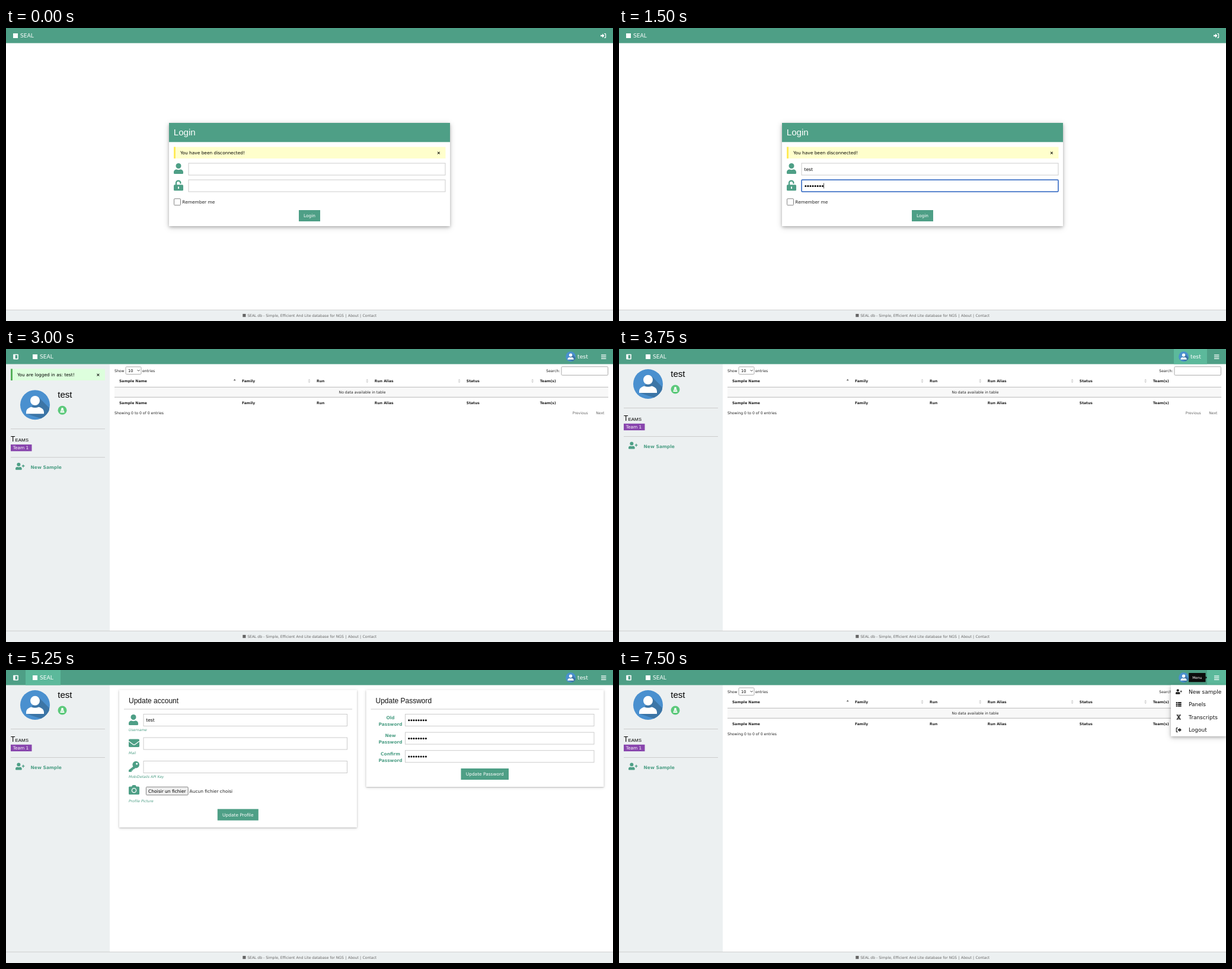
Animation, 1024 px wide and 494 px high, one loop 8 s. Source, as an HTML page:

```html
<!DOCTYPE html>
<html lang="en">
<head>
<meta charset="utf-8">
<title>SEAL db</title>
<style>
html, body { margin: 0; width: 100%; height: 100%; overflow: hidden; background: #fff; }
svg { display: block; width: 1024px; height: 494px; }
text { font-family: "DejaVu Sans", Verdana, sans-serif; white-space: pre; }
.head { font-family: "Liberation Sans", Arial, sans-serif; }
.bold { font-weight: bold; }
.mid { text-anchor: middle; }
.caps { font-variant: small-caps; }
.it { font-style: italic; }
.big { filter: drop-shadow(0 2px 2.5px rgba(0,0,0,.2)) drop-shadow(0 2px 5px rgba(0,0,0,.19)); }
.card { filter: drop-shadow(0 1px 1.3px rgba(0,0,0,.2)) drop-shadow(0 1px 2.5px rgba(0,0,0,.14)); }
[data-part] { display: none; }
</style>
</head>
<body>
<svg id="stage" viewBox="0 0 1024 494" xmlns="http://www.w3.org/2000/svg"></svg>
<script>
const GREEN = '#4e9f86', LIGHT = '#5cb99b', PALE = '#ecf0f1', INK = '#222', BLUE = '#2f68c8';
const LOGIN_NAME = 'test';
const STEP = 750, LOOP = 8000;

// Parts visible during each step
const steps = [
  'login',
  'login name focusName',
  'login name secret focusSecret',
  'login name secret press',
  'app flash table',
  'app table overAccount',
  'app account',
  'app account overHome',
  'app table',
  'app table overMenu',
  'app table overMenu drop'
].map(s => s.split(' '));

// Drawing helpers
const text = (x, y, str, size, fill = INK, cls = '') =>
  `<text x="${x}" y="${y}" font-size="${size}" fill="${fill}" class="${cls}">${str}</text>`;
const box = (x, y, w, h, fill, more = '') =>
  `<rect x="${x}" y="${y}" width="${w}" height="${h}" fill="${fill}" ${more}/>`;
const disc = (x, y, r, fill) => `<circle cx="${x}" cy="${y}" r="${r}" fill="${fill}"/>`;
const shape = (d, fill, more = '') => `<path d="${d}" fill="${fill}" ${more}/>`;
const line = (d, color, w = 1) => `<path d="${d}" fill="none" stroke="${color}" stroke-width="${w}"/>`;
const part = (name, ...items) => `<g data-part="${name}">${items.join('')}</g>`;
const at = (x, y, inner, scale = 1) => `<g transform="translate(${x} ${y}) scale(${scale})">${inner}</g>`;
const rule = (x1, x2, y, color = '#ccc', w = 1) => line(`M${x1} ${y}H${x2}`, color, w);
const field = (x, y, w, h = 20, color = '#ccc') => box(x + .5, y + .5, w - 1, h - 1, '#fff', `stroke="${color}"`);
const ring = (x, y, w, h) => box(x, y, w, h, 'none', `stroke="${BLUE}" stroke-width="1.5" rx="1.5"`);
const button = (x, y, w, h, label, fill = GREEN) =>
  box(x, y, w, h, fill) + text(x + w / 2, y + h / 2 + 2.8, label, 7.45, '#fff', 'mid');
const dots = (x, y) => Array.from({ length: 8 }, (_, i) => disc(x + i * 4.08, y, 1.5, '#000')).join('');
const notice = (x, y, w, msg, fill, edge) =>
  box(x, y, w, 19.5, fill) + box(x, y, 3, 19.5, edge) +
  text(x + 11, y + 12.6, msg, 7.42, '#000') + text(x + w - 11.5, y + 12.6, '×', 7.5, '#000', 'mid bold');

// Icons, placed by their top left corner
const person = (x, y, fill = GREEN, s = 1) => at(x, y,
  disc(8, 4.5, 4.5, fill) + shape('M0 18V15.5C0 12 2 10.5 5 10.5Q8 12 11 10.5C14 10.5 16 12 16 15.5V16.5Q16 18 14.5 18H1.5Q0 18 0 16.5Z', fill), s);
const addPerson = (x, y, fill, s = 1) =>
  at(x, y, person(0, 0, fill, .67) + line('M10.8 5.6H15.4M13.1 3.3V7.9', fill, 1.4), s);
const lock = (x, y) => at(x, y,
  box(0, 8, 16, 10, GREEN, 'rx="1.6"') + line('M4 9V5A3.6 3.6 0 0 1 11.4 5V6.2', GREEN, 2.3) +
  box(7, 11, 2, 4, '#fff', 'rx="1"'));
const envelope = (x, y) => at(x, y,
  box(0, 0, 18, 13.5, GREEN, 'rx="1.7"') + line('M0 3.6L7 8.7Q9 10.2 11 8.7L18 3.6', '#fff', 1.2));
const key = (x, y) => at(x, y,
  shape('M8.5 8.2L0 15V18H5V15.8H7V13.6H9L11 11.5Z', GREEN) + disc(12.2, 5.8, 5.8, GREEN) + disc(13.7, 4.3, 1.6, '#fff'));
const camera = (x, y) => at(x, y,
  shape('M5 2.5L6 .8Q6.4 0 7.3 0H10.7Q11.6 0 12 .8L13 2.5H16.4Q18 2.5 18 4V14.4Q18 16 16.4 16H1.6Q0 16 0 14.4V4Q0 2.5 1.6 2.5Z', GREEN) +
  `<circle cx="9" cy="9" r="3.6" fill="none" stroke="#fff" stroke-width="1.3"/>`);
const doorArrow = (x, y, fill) => at(x, y,
  shape('M0 2.8H3V.6L6.6 4L3 7.4V5.2H0Z', fill) + line('M6.2 .6H8Q8.6 .6 8.6 1.2V6.8Q8.6 7.4 8 7.4H6.2', fill, 1.2));
const exitArrow = (x, y, fill) => at(x, y,
  shape('M3 2.8H5.6V.6L9.2 4L5.6 7.4V5.2H3Z', fill) + line('M3 .6H1.2Q.6 .6 .6 1.2V6.8Q.6 7.4 1.2 7.4H3', fill, 1.2));
const list = (x, y, fill) => at(x, y,
  [0, 2.8, 5.6].map(r => box(0, r, 2.3, 2.1, fill) + box(3, r, 6, 2.1, fill)).join(''));
const helix = (x, y, fill) => at(x, y,
  line('M1 0C1 4 7 4.5 7 9M7 0C7 4 1 4.5 1 9', fill, 1.2) + line('M1 .9H7M2 2.4H6M2 6.6H6M1 8.1H7', fill, .8));

const avatar = (x, y, s = 1) => at(x, y,
  disc(0, 0, 25, '#4a90cf') +
  shape('M6 -13L24 5Q25 12 15.5 19.6L10 23L-14 15Z', '#3c75a6') +
  disc(0, -7.2, 8, '#fff') +
  shape('M-15 15V12.5C-15 7 -10 4.3 -6 3.6Q0 6 6 3.6C10 4.3 15 7 15 12.5V15Z', '#fff'), s);
const badge = (x, y) => at(x, y,
  disc(0, 0, 7.5, '#5cc97b') + disc(0, -2.5, 1.8, '#fff') +
  shape('M-1.8 -1.6H1.8L3.7 4H-3.7Z', '#fff') + rule(-2, 2, 1.4, '#5cc97b', .8));

const brand = x => box(x, 9, 8, 8, '#fff') + text(x + 12, 16.2, 'SEAL', 9.15, '#fff');

function loginPage() {
  return part('login',
    `<g class="big">${box(275, 160, 474, 174, '#fff')}</g>`,
    box(275, 160, 474, 32.3, GREEN),
    text(282.8, 181, 'Login', 15.1, '#fff', 'head'),
    notice(283, 200.5, 458.5, 'You have been disconnected!', '#ffffcc', '#ffeb5a'),
    person(283, 228), field(307.5, 227.5, 434, 21),
    lock(283, 256.3), field(307.5, 255.5, 434, 21),
    box(283.5, 287.8, 11, 11, '#fff', 'stroke="#777" stroke-width=".9" rx="1.3"'),
    text(297.3, 296.2, 'Remember me', 7.45),
    button(494, 307, 36, 19, 'Login'),
    brand(12), doorArrow(1003, 9, '#fff')) +
  part('name', text(312.5, 240.8, LOGIN_NAME, 7.5, '#000')) +
  part('secret', dots(314.8, 266.4)) +
  part('focusName', ring(308, 228, 433, 20), box(328.2, 233.5, .7, 9, '#000')) +
  part('focusSecret', ring(308, 256, 433, 20), box(345.3, 261.5, .7, 9, '#000')) +
  part('press', button(494, 307, 36, 19, 'Login', LIGHT), ring(494, 307, 36, 19));
}

function sidebar() {
  return part('app', box(0, 25.5, 175, 450, PALE),
    part('flash', notice(8, 33.5, 159, `You are logged in as: ${LOGIN_NAME}!`, '#ddffdd', '#55b15a')),
    `<g id="side">${[
      avatar(49, 59),
      text(87.2, 47, LOGIN_NAME, 15.1, '#000', 'head'),
      badge(95, 68),
      rule(8, 167, 99.5),
      text(8, 121.2, 'Teams', 12.1, '#000', 'head caps'),
      box(8, 125.8, 35.5, 11.3, '#8845ad'),
      text(11.7, 134.3, 'Team 1', 7.4, '#fff'),
      rule(8, 167, 147.5),
      addPerson(16, 156.5, GREEN),
      text(41.6, 166.7, 'New Sample', 7.5, GREEN, 'bold')
    ].join('')}</g>`);
}

function tablePage() {
  const columns = [[191, 'Sample Name'], [398, 'Family'], [524, 'Run'], [621.8, 'Run Alias'], [776.8, 'Status'], [900.8, 'Team(s)']];
  const names = y => columns.map(([x, s]) => text(x, y, s, 6.05, INK, 'bold')).join('');
  const arrows = [385.7, 511.5, 609.3, 764.6, 888.2].map((x, i) =>
    shape(`M${x - 2} 53.3L${x} 50.6L${x + 2} 53.3Z`, i ? '#d0d0d0' : '#666') +
    (i ? shape(`M${x - 2} 54.6L${x} 57.2L${x + 2} 54.6Z`, '#d0d0d0') : '')).join('');
  return part('table',
    text(183, 38.6, 'Show', 6.15),
    box(202, 30, 26, 12.6, '#fff', 'stroke="#aaa" rx="1.5"'),
    text(206, 38.9, '10', 6.6, '#000'), line('M221.6 35.2L223.6 37.2L225.6 35.2', '#222', .9),
    text(230, 38.6, 'entries', 6.15),
    text(911.3, 39.4, 'Search:', 6.15),
    box(937, 29.8, 78.5, 14.4, '#fff', 'stroke="#aaa" rx="1.5"'),
    names(56.3), arrows,
    box(183, 64, 833, 17.3, '#f8f8f8'),
    rule(183, 1016, 64.3, '#aaa', .8), rule(183, 1016, 81.3, '#aaa', .8),
    text(601, 74.8, 'No data available in table', 6.15, INK, 'mid'),
    names(93.2),
    text(183, 109.8, 'Showing 0 to 0 of 0 entries', 6.15),
    text(955.8, 110.3, 'Previous', 6.15, '#666'),
    text(995.2, 110.3, 'Next', 6.15, '#666'));
}

function accountPage() {
  const panel = (x, w, h, title) =>
    `<g class="card">${box(x, 33.5, w, h, '#fff')}</g>` +
    text(x + 16, 55.6, title, 12, '#111', 'head') + rule(x + 8, x + w - 8, 66);
  const caption = (y, s) => text(207, y, s, 6, GREEN, 'it');
  const secrets = ['Old', 'New', 'Confirm'].map((s, i) => {
    const y = i * 30.6;
    return text(648.5, 82.5 + y, s, 7.45, GREEN, 'mid bold') + text(648.5, 93.8 + y, 'Password', 7.45, GREEN, 'mid bold') +
      field(673, 74 + y, 319.5, 21) + dots(679.8, 84.8 + y);
  }).join('');
  return part('account',
    panel(191, 401, 232, 'Update account'),
    person(207, 75), field(231.5, 74, 344.5, 21), text(236.3, 87.3, LOGIN_NAME, 7.5, '#000'), caption(102.7, 'Username'),
    envelope(207, 116.5), field(231.5, 113.5, 344.5, 21), caption(142.2, 'Mail'),
    key(207, 153.8), field(231.5, 153, 344.5, 21), caption(181.8, 'MobiDetails API Key'),
    camera(207, 194), box(236.4, 197.2, 70.8, 13.6, '#efefef', 'stroke="#777" stroke-width=".9" rx="1.3"'),
    text(240, 206.8, 'Choisir un fichier', 7.5, '#000'), text(309.6, 206.8, 'Aucun fichier choisi', 7.45),
    caption(223.3, 'Profile Picture'),
    button(356.8, 234.4, 69, 19.2, 'Update Profile'),
    panel(607.5, 401, 163.5, 'Update Password'),
    secrets,
    button(767.5, 166, 80.5, 19, 'Update Password'));
}

function topBar() {
  return box(0, 0, 1024, 25.5, GREEN) +
    part('overHome', box(33, 0, 59, 25.5, LIGHT)) +
    part('overAccount', box(936, 0, 56, 25.5, LIGHT)) +
    part('overMenu', box(992, 0, 32, 25.5, LIGHT)) +
    part('app',
      box(12.2, 8.8, 8.6, 8.6, '#fff', 'rx=".8"'), box(15.6, 10.2, 3.6, 5.8, GREEN),
      brand(45), avatar(952.6, 12.7, .34), text(964, 15.7, LOGIN_NAME, 9.3, '#fff'),
      [10.2, 13.2, 16.2].map(y => rule(1004, 1012.4, y, '#fff', 1.3)).join('')) +
    part('overMenu',
      box(961.2, 5, 28.3, 15.3, '#0c0c0c'), shape('M989.5 10.6L992 12.8L989.5 15Z', '#0c0c0c'),
      text(975.3, 15, 'Menu', 5.9, '#fff', 'mid'));
}

function dropdown() {
  const items = ['New sample', 'Panels', 'Transcripts', 'Logout'];
  return part('drop',
    `<g class="big">${box(931, 26, 93, 85.5, '#fff')}</g>`,
    box(931, 25.5, 93, 86, '#fff'),
    items.map((s, i) => text(961, 39.7 + i * 21.5, s, 9, '#111')).join(''),
    addPerson(939, 32.2, '#222', .7), list(939.7, 54, '#222'), helix(940.2, 75, '#222'), exitArrow(939.7, 97, '#222'));
}

function footer() {
  const grey = '#666';
  return box(0, 475, 1024, 19, PALE) + rule(0, 1024, 475.4, '#ccc', .9) +
    box(399.3, 482, 5.2, 5.2, grey) +
    [[407.2, 'SEAL db - Simple, Efficient And Lite database for NGS'], [572.5, '|'], [577, 'About'], [597, '|'], [601.5, 'Contact']]
      .map(([x, s]) => text(x, 486.6, s, 6.08, grey)).join('');
}

const stage = document.getElementById('stage');
stage.innerHTML = sidebar() + tablePage() + accountPage() + topBar() + loginPage() + footer() + dropdown();

const parts = [...stage.querySelectorAll('[data-part]')];
const side = document.getElementById('side');
const start = performance.now();
let current = -1;

function show(i) {
  const on = steps[i];
  for (const p of parts) p.style.display = on.includes(p.dataset.part) ? 'inline' : 'none';
  side.setAttribute('transform', `translate(0 ${on.includes('flash') ? 35.2 : 0})`);
}

function tick() {
  const t = (performance.now() - start) % LOOP;
  const i = Math.min(steps.length - 1, Math.floor(t / STEP));
  if (i !== current) show(current = i);
  requestAnimationFrame(tick);
}
tick();
</script>
</body>
</html>
```
